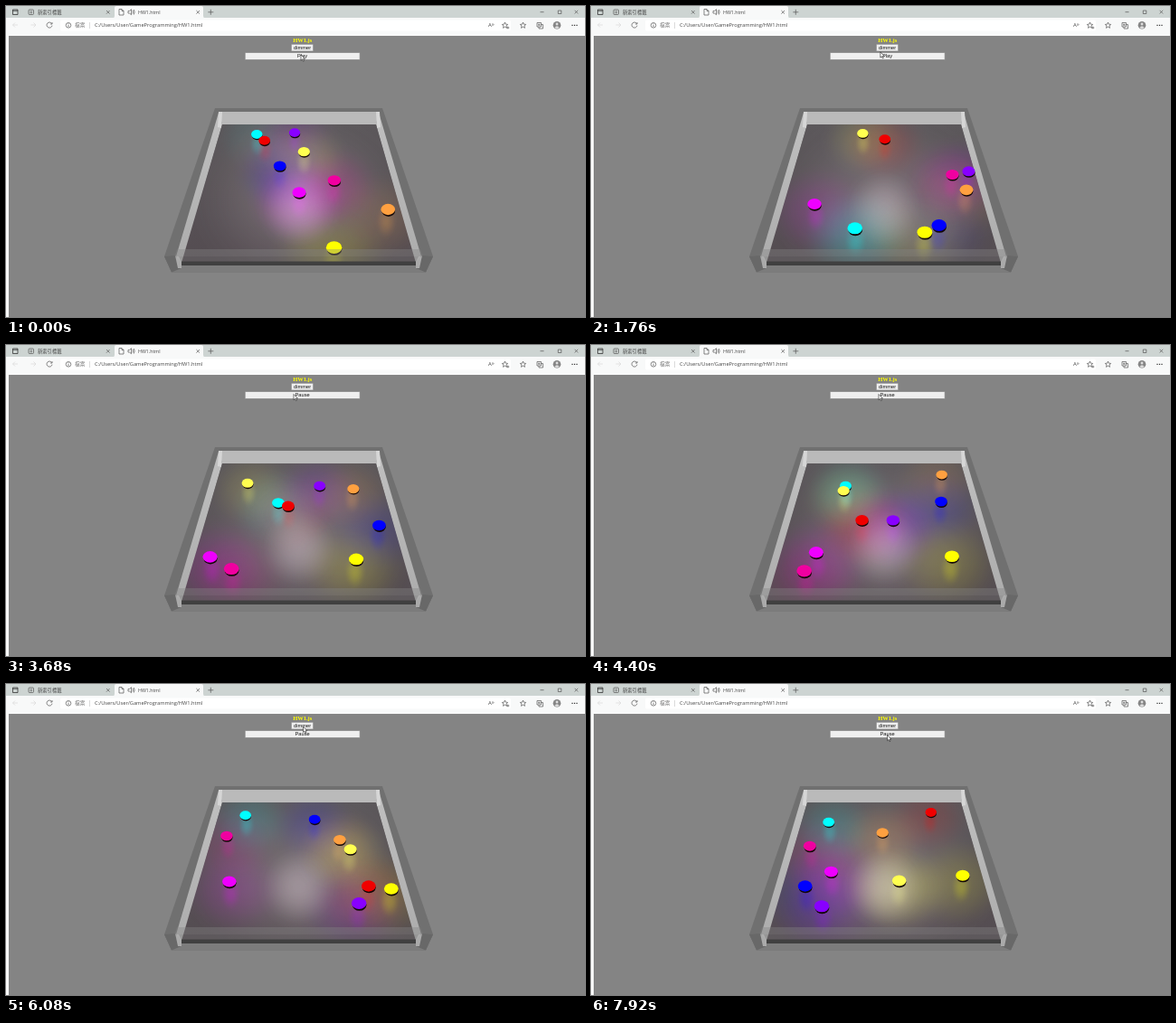
Recreate the animation shown at these times as an HTML page. Size 640 by 344 pixels, loop 8000 ms.

```html
<!DOCTYPE html>
<html lang="zh-Hant">
<head>
<meta charset="utf-8">
<title>HW1</title>
<style>
html, body { margin: 0; width: 100%; height: 100%; overflow: hidden; background: #848484; }
svg { display: block; width: 100%; height: 100%; }
text { font-family: "Liberation Sans", Arial, sans-serif; font-size: 5.7px; fill: #111; }
.ui { font-family: "Open Sans", "Noto Sans CJK TC", "Noto Sans CJK", sans-serif; font-size: 5.3px; fill: #444; }
.mid { text-anchor: middle; }
.line { fill: none; stroke: #555; stroke-width: .7; }
.glow { mix-blend-mode: screen; }
</style>
</head>
<body>
<svg viewBox="0 0 640 344" preserveAspectRatio="none">
  <defs id="defs">
    <clipPath id="floorClip"><path d="M239 131H409L453 284H194Z"/></clipPath>
    <linearGradient id="floor" x1="0" y1="0" x2="0" y2="1">
      <stop offset="0" stop-color="#5c585b"/>
      <stop offset="1" stop-color="#544c51"/>
    </linearGradient>
    <linearGradient id="side" x1="0" y1="0" x2="0" y2="1">
      <stop offset="0" stop-color="#c0c0c0"/>
      <stop offset="1" stop-color="#acacac"/>
    </linearGradient>
  </defs>

  <rect width="640" height="344" fill="#848484"/>

  <!-- browser window -->
  <rect width="640" height="14" fill="#cdd4d2"/>
  <rect y="13" width="640" height="20" fill="#f8f9f9"/>
  <rect y="30" width="3" height="314" fill="#f8f9f9"/>
  <path d="M118 13.5Q120 13 120 11V2Q120 0 122 0H216Q218 0 218 2V11Q218 13 220 13.5Z" fill="#f8f9f9"/>
  <rect x="60" y="15.5" width="498" height="12" rx="2" fill="#fff"/>
  <g class="line">
    <path d="M7.5 4H13V9.5H7.5ZM7.5 5.3H13" stroke="#222"/>
    <rect x="25" y="4" width="5.5" height="5.5" rx="1"/>
    <path d="M26.5 6H29M26.5 7.7H29"/>
    <path d="M111 5L114.6 8.6M114.6 5L111 8.6M210.4 5L214 8.6M214 5L210.4 8.6"/>
    <path d="M125 3.5H128L130 5.5V10H125ZM128 3.5V5.5H130"/>
    <path d="M135 5.5H136.5L138.5 3.7V9.7L136.5 8H135ZM140 5Q141.2 6.7 140 8.5M141.3 4Q143 6.7 141.3 9.5"/>
    <path d="M223.3 6.8H229.3M226.3 3.8V9.8"/>
    <path d="M590.5 6.7H594.5M610.3 5H613.8V8.5H610.3ZM628.6 4.8L632.2 8.4M632.2 4.8L628.6 8.4"/>
    <path d="M13 21H7.5M10 18.5L7.5 21L10 23.5M27.5 21H33M30.5 18.5L33 21L30.5 23.5" stroke="#d8d8d8"/>
    <path d="M50.6 19.5A3 3 0 1 0 51 21.6M51 18V20H49"/>
    <circle cx="69" cy="21.3" r="2.8"/>
    <path d="M69 20.8V23M69 19.4V20.1"/>
    <path d="M92.5 18V25" stroke="#ccc"/>
    <path id="star" d="M571.5 18L572.4 20.2L574.7 20.4L573 22L573.5 24.3L571.5 23.1L569.5 24.3L570 22L568.3 20.4L570.6 20.2Z"/>
    <use href="#star" x="-20"/>
    <path d="M553.5 24H556.3M554.9 22.6V25.4"/>
    <path d="M587 18.5H591.5V23H587ZM589 23V25H593.5V20.5H591.5M589.2 19.6V22M588 20.8H590.5"/>
  </g>
  <circle cx="609" cy="21.3" r="4.3" fill="#858585"/>
  <circle cx="609" cy="20" r="1.4" fill="#ddd"/>
  <path d="M606.3 24Q609 20.7 611.7 24Q609 26 606.3 24Z" fill="#ddd"/>
  <path d="M625.4 21.3H632" stroke="#333" stroke-width="1.2" stroke-dasharray="1.2 1.3"/>
  <text class="ui" x="35" y="8.6">新索引標籤</text>
  <text class="ui" x="146" y="8.6">HW1.html</text>
  <text class="ui" x="76" y="23.2" style="fill:#777;font-size:5.7px">檔案</text>
  <text class="ui" x="98" y="23.2" style="font-size:5.7px">C:/Users/User/GameProgramming/HW1.html</text>
  <text class="ui" x="533" y="23.4" style="font-size:6px">A<tspan dy="-1.5">»</tspan></text>

  <!-- page controls -->
  <text class="mid" x="327.7" y="40.2" style="font:bold 6.5px 'Liberation Serif',serif;fill:#ff0">HW1.js</text>
  <g fill="#efefef" stroke="#808080" stroke-width=".7">
    <rect x="315.3" y="42.2" width="24.4" height="7.8" rx=".6"/>
    <rect x="264.2" y="51.4" width="127" height="8.2" rx=".6"/>
  </g>
  <text class="mid" x="327.6" y="47.9">dimmer</text>
  <text class="mid" x="327.6" y="57.3" id="play">Play</text>

  <!-- arena -->
  <path d="M231 113H416L472 277L464 294.5H183L175 277Z" fill="#707070"/>
  <path d="M235 117H412L409 131H239Z" fill="#bababa"/>
  <path d="M235 118L239 131L194 287L188 277Z" fill="url(#side)"/>
  <path d="M412 118L409 131L453 287L459 277Z" fill="url(#side)"/>
  <path d="M235 117H239L238 135L234 134ZM409 117H413L414 134L410 135Z" fill="#d6d6d6"/>
  <path d="M239 131H409L453 284H194Z" fill="url(#floor)"/>
  <g clip-path="url(#floorClip)" id="lights"></g>
  <g id="pucks"></g>
  <path d="M189 269H458L461 277H186Z" fill="#858585" fill-opacity=".38"/>
  <path d="M191 277H456L453 283H194Z" fill="#707070" fill-opacity=".36"/>
  <path d="M194 282.5H453V287H194Z" fill="#404040"/>
  <path d="M194 287H453L464 294.5H183Z" fill="#7c7c7c"/>
  <path d="M175 277L187 276L194 290L183 294.5ZM472 277L460 276L453 290L464 294.5Z" fill="#686868"/>
  <path d="M187 276L194 283V290L190 290ZM460 276L453 283V290L457 290Z" fill="#aaa"/>

  <path id="cursor" d="M0 0V6.2L1.5 4.9L2.5 7.1L3.5 6.6L2.5 4.5H4.4Z" fill="#fff" stroke="#111" stroke-width=".55"/>
</svg>
<script>
const LOOP = 8, STEP = .08;

// Each puck glides straight between knocks [time, across, depth].
// The floor spans -1..1 across and 0..1 deep; values beyond it reflect off the walls.
const pucks = [
  { color: '#00ffff', knocks: [[0, -.56, .94], [1.76, -.29, .12], [2.8, .35, .42], [3.68, -.25, .63], [5.04, -.7, .95], [7.92, -.71, .83]] },
  { color: '#f00000', knocks: [[0, -.45, .87], [2.8, .28, 1.26], [3.68, -.13, 1.4], [5.04, -.36, 1.64], [6.08, .73, 1.74], [7.92, .62, 1.06]] },
  { color: '#8800ff', knocks: [[0, -.06, .96], [1.76, .99, .56], [3.68, .26, 1.2], [5.04, -.04, 1.82], [6.08, .6, 2.14], [7.92, -.62, 2.12]] },
  { color: '#ffff50', knocks: [[0, .06, .75], [3.68, -.66, 1.17], [5.04, -.37, 1.32], [6.08, .6, 1.44], [7.92, .16, 1.7]] },
  { color: '#0000ff', knocks: [[0, -.23, .61], [1.76, .55, .14], [6.08, 1.8, -1.14], [7.92, 2.83, -1.74]] },
  { color: '#ee00ff', knocks: [[0, 0, .38], [1.76, -.74, .29], [3.68, -.91, .19], [5.04, -1.64, .25], [7.92, -.58, .37]] },
  { color: '#f000a0', knocks: [[0, .4, .48], [1.76, .79, .53], [3.68, -.67, .11], [5.04, -.89, -.28], [7.92, -.88, -1.41]] },
  { color: '#ffa040', knocks: [[0, .93, .25], [2.8, .9, .49], [3.68, .68, .77], [5.04, .83, 1.06], [6.08, .49, 1.35], [7.92, -.02, 1.28]] },
  { color: '#ffff00', knocks: [[0, .33, 0], [2.8, .44, .15], [6.08, .96, .24], [7.92, 1.15, .34]] }
];
const cursorPath = [[0, 326, 54], [1.7, 320, 50.5], [2.4, 318, 54.5], [5.4, 318, 54.5], [5.8, 329, 43], [6.7, 327.5, 56.5], [LOOP, 327.5, 56.5]];

const $ = id => document.getElementById(id);
const mix = (a, b, k) => a + (b - a) * k;
const fold = v => Math.abs(v - 2 * Math.round(v / 2));

function along(path, t) {
  const next = path.findIndex(p => p[0] > t);
  const i = next < 0 ? path.length - 1 : next;
  const [t0, x0, y0] = path[i - 1], [t1, x1, y1] = path[i];
  const k = Math.min(1, (t - t0) / (t1 - t0));
  return [mix(x0, x1, k), mix(y0, y1, k)];
}

// Perspective: size on screen grows with distance below the horizon
const HORIZON = -170, CENTER = 324, HALF = .267, NEAR = 1 / 438, FAR = 1 / 307;
function place(path, t) {
  const [u, v] = along(path, t);
  const size = 1 / mix(NEAR, FAR, fold(v));
  const across = fold((u + 1) / 2) * 2 - 1;
  return { x: CENTER + across * HALF * size, y: HORIZON + size, r: .0195 * size };
}

function set(el, attrs) {
  for (const key in attrs) el.setAttribute(key, attrs[key]);
  return el;
}
function make(parent, tag, attrs) {
  const el = document.createElementNS('http://www.w3.org/2000/svg', tag);
  parent.append(el);
  return set(el, attrs);
}
function gradient(id, color) {
  const g = make($('defs'), 'radialGradient', { id });
  for (let d = 0; d <= 1; d += .125)
    make(g, 'stop', { offset: d, 'stop-color': color, 'stop-opacity': (1 - d * d) ** 2 });
}
const glow = (id, attrs) => make($('lights'), 'ellipse', { class: 'glow', fill: `url(#${id})`, ...attrs });

gradient('white', '#ffe8f4');
glow('white', { cx: CENTER, cy: 215, rx: 125, ry: 105, opacity: .17 });
glow('white', { cx: CENTER, cy: 225, rx: 46, ry: 48, opacity: .3 });

pucks.forEach((p, i) => {
  gradient('g' + i, p.color);
  p.halo = glow('g' + i, {});
  p.streak = glow('g' + i, {});
  p.group = make($('pucks'), 'g', {});
  make(p.group, 'ellipse', { cx: .06, cy: .14, rx: .96, ry: .78, fill: '#140808' });
  make(p.group, 'ellipse', { cy: -.1, rx: 1.02, ry: .8, fill: p.color });
});

function draw(t) {
  for (const p of pucks) {
    const { x, y, r } = p.pos = place(p.knocks, t);
    const near = Math.exp(-((x - CENTER) ** 2 + (y - 218) ** 2) / 2600);
    set(p.group, { transform: `translate(${x} ${y}) scale(${r})` });
    set(p.halo, { cx: mix(x, CENTER, .08), cy: y + r, rx: r * 8, ry: r * 7, opacity: .13 + .2 * near });
    set(p.streak, { cx: mix(x, CENTER, .02), cy: y + r * 1.6, rx: r * 1.6, ry: r * 2.6, opacity: .22 });
  }
  [...pucks].sort((a, b) => a.pos.y - b.pos.y).forEach(p => $('pucks').append(p.group));
  $('play').textContent = t < 2.4 ? 'Play' : 'Pause';
  set($('cursor'), { transform: `translate(${along(cursorPath, t)})` });
}

const start = performance.now();
function tick() {
  const t = (performance.now() - start) / 1000 % LOOP;
  draw(Math.floor(t / STEP) * STEP);
  requestAnimationFrame(tick);
}
tick();
</script>
</body>
</html>
```
